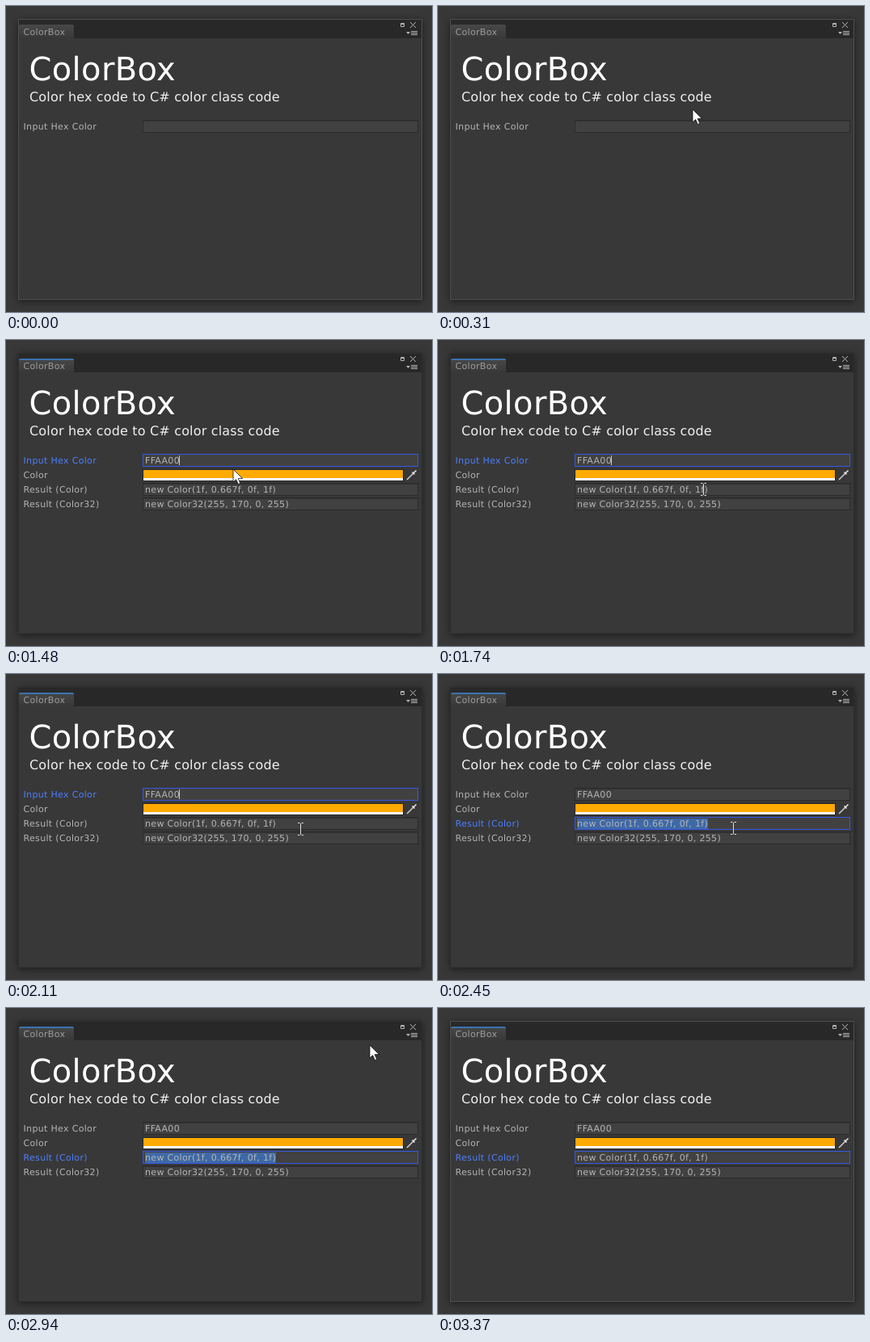
Recreate the animation shown at these times as an HTML page. Size 527 by 379 pixels, loop 3550 ms.

```html
<!DOCTYPE html>
<html lang="en">
<head>
<meta charset="utf-8">
<title>ColorBox</title>
<style>
  html, body { margin: 0; width: 100%; height: 100%; overflow: hidden; background: #383838; }
  svg { display: block; width: 527px; height: 379px; }
  text {
    font: 11px "DejaVu Sans", Verdana, sans-serif; letter-spacing: .33px;
    fill: #b4b4b4; white-space: pre; text-rendering: geometricPrecision;
  }
  .title { font-size: 40px; letter-spacing: .35px; fill: #fff; }
  .sub { font-size: 16px; letter-spacing: .17px; fill: #f0f0f0; }
  .tab { fill: #9c9c9c; }
  .box { fill: #414141; stroke: #2b2b2b; }
  .lip { fill: #242424; }
  .focus .label { fill: #4c7eff; }
  .focus .box { stroke: #3657e4; }
  .focus .lip { fill: none; }
  .shadow { filter: drop-shadow(0 2px 5px rgba(0, 0, 0, .5)); }
  .icon { fill: none; stroke: #b4b4b4; }
</style>
</head>
<body>
<svg viewBox="0 0 527 379">
  <defs>
    <linearGradient id="tabFill" x2="0" y2="1">
      <stop stop-color="#484848"/><stop offset="1" stop-color="#383838"/>
    </linearGradient>
  </defs>

  <rect class="shadow" x="15" y="16" width="500" height="348" fill="#383838"/>
  <rect x="15" y="16" width="500" height="24" fill="#282828"/>
  <rect id="frame" x="15.5" y="16.5" width="499" height="347" fill="none"/>

  <path d="M16 40V25Q16 23 18 23H82Q84 23 84 25V40Z" fill="url(#tabFill)"/>
  <path id="tabLine" d="M16 25Q16 23 18 23H82Q84 23 84 25Z" fill="#3a72b0"/>
  <text class="tab" x="21.5" y="36">ColorBox</text>

  <g class="icon">
    <path d="M488.5 21.5H492.5V25.5H488.5ZM488 22.5H493M500 20L507 27M507 20L500 27"/>
    <path d="M501 31.5H509M501 33.5H509M501 35.5H509"/>
    <path d="M495 32H500L497.5 35Z" fill="#b4b4b4" stroke="none"/>
  </g>

  <text class="title" x="28.5" y="92">ColorBox</text>
  <text class="sub" x="29" y="118">Color hex code to C# color class code</text>

  <g id="input"></g>
  <g id="results">
    <text x="21.5" y="171">Color</text>
    <rect x="169" y="160" width="323" height="15" fill="#252525"/>
    <rect x="170" y="161" width="321" height="10" fill="#fa0"/>
    <rect x="170" y="171" width="321" height="3" fill="#fff"/>
    <path d="M496 173L504 165" stroke="#ccc" stroke-width="1.6"/>
    <path d="M502.5 163.5L505.5 166.5M503.5 165.5L507.5 161.5" stroke="#e4e4e4" stroke-width="1.6"/>
    <g id="color"></g>
    <g id="color32"></g>
  </g>
  <rect id="caret" y="143" width="1" height="12" fill="#c8c8c8"/>

  <path id="arrow" d="M0 0V16L3.7 12.6L6.3 18.6L8.8 17.5L6.2 11.6H11.5Z" fill="#fff" stroke="#111" stroke-width=".8"/>
  <path id="beam" d="M-3 -7.5H-.5M1.5 -7.5H4M.5 -7V7M-3 7.5H-.5M1.5 7.5H4" fill="none" stroke="#ddd"/>
</svg>
<script>
  const LOOP = 3550;
  const $ = id => document.getElementById(id);
  const show = (el, on) => el.setAttribute("visibility", on ? "visible" : "hidden");

  function field(id, y, label, value, selectedWidth = 0) {
    $(id).innerHTML = `
      <text class="label" x="21.5" y="${y + 12}">${label}</text>
      <rect class="box" x="169.5" y="${y + .5}" width="340" height="15"/>
      <rect class="lip" x="170" y="${y + 1}" width="339" height="1" opacity=".5"/>
      <rect class="selection" x="172" y="${y + 2}" width="${selectedWidth}" height="13" fill="#3e69a7"/>
      <text class="value" x="172" y="${y + 12}">${value}</text>`;
  }
  field("input", 141, "Input Hex Color", "FFAA00");
  field("color", 177, "Result (Color)", "new Color(1f, 0.667f, 0f, 1f)", 162);
  field("color32", 195, "Result (Color32)", "new Color32(255, 170, 0, 255)");
  const value = document.querySelector("#input .value");
  const selection = document.querySelector("#color .selection");

  const linear = p => p;
  const easeOut = p => p * (1.6 - .6 * p);
  const easeInOut = p => p * p * (3 - 2 * p);

  // Pointer path: time, x, y, easing towards the next point
  const path = [
    [110, 467, 1, easeOut], [400, 282, 156], [1479, 282, 156],
    [1480, 281, 160, easeInOut], [1930, 357, 200], [1990, 357, 200],
    [2010, 359, 204], [2030, 361, 205], [2110, 364, 192], [2449, 364, 192],
    [2450, 365, 191], [2560, 365, 191], [2940, 450, 46], [2970, 452, 38],
    [3100, 469, -19]
  ];

  function pointerAt(t) {
    const i = path.findIndex(k => k[0] > t);
    if (i < 1) return null;
    const [t0, x0, y0, ease = linear] = path[i - 1];
    const [t1, x1, y1] = path[i];
    const p = ease((t - t0) / (t1 - t0));
    return [Math.round(x0 + (x1 - x0) * p), Math.round(y0 + (y1 - y0) * p)];
  }

  function draw(t) {
    const filled = t >= 1030;
    const onInput = t >= 760 && t < 2190;
    const onColor = t >= 2190;
    const active = Math.min(1, Math.max(0, (t - 700) / 60)) * (t < 3350 ? 1 : t < 3370 ? .5 : 0);
    const gray = Math.round(78 - 32 * active);

    $("frame").setAttribute("stroke", `rgb(${gray},${gray},${gray})`);
    show($("tabLine"), t >= 740);
    $("input").classList.toggle("focus", onInput);
    $("color").classList.toggle("focus", onColor);
    $("results").style.display = filled ? "" : "none";
    show(value, filled);
    show(selection, t >= 2300 && t < 3350);
    show($("caret"), onInput);
    $("caret").setAttribute("x", filled ? 214 : 172);

    const pos = pointerAt(t);
    const rows = filled ? [141, 177, 195] : [141];
    const overField = pos && pos[0] > 168 && pos[0] < 510 &&
      rows.some(y => pos[1] >= y && pos[1] <= y + 16);
    show($("arrow"), pos && !overField);
    show($("beam"), overField);
    if (pos) {
      for (const id of ["arrow", "beam"]) $(id).setAttribute("transform", `translate(${pos})`);
    }
  }

  const start = performance.now();
  function tick() {
    draw((performance.now() - start) % LOOP);
    requestAnimationFrame(tick);
  }
  tick();
</script>
</body>
</html>
```
